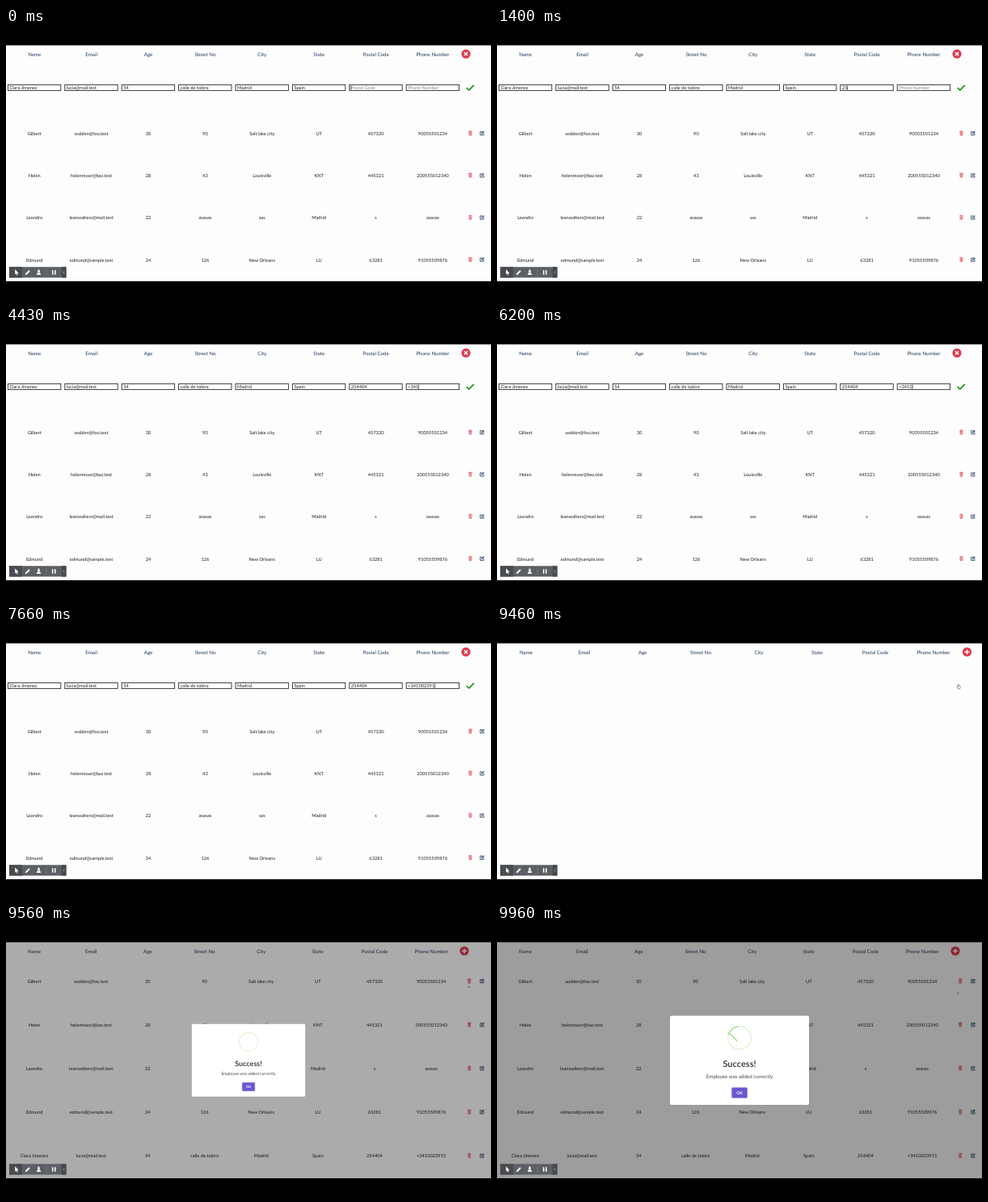
Write an HTML page that moves like this. It is 600x336 px and loops after 10 s.

```html
<!DOCTYPE html>
<html lang="en">
<head>
<meta charset="utf-8">
<title>Employee table</title>
<style>
  html, body { margin: 0; width: 100%; height: 100%; overflow: hidden; background: #000; }
  svg { display: block; width: 600px; height: 336px; }
  text { font: 5.7px Lato, "Open Sans", sans-serif; fill: #1d1f24; text-rendering: geometricPrecision; white-space: pre; }
  .mid { text-anchor: middle; }
  .head { font-size: 6.2px; fill: #1f3a5f; }
  .hint { fill: #858585; }
  .box { fill: #fff; stroke: #2b2b2b; stroke-width: .9; }
  .title { font-size: 11px; font-weight: 700; fill: #444; }
  .note { font-size: 6.2px; fill: #444; }
  .ok { font-size: 5.2px; font-weight: 700; fill: #fff; }
</style>
</head>
<body>
<svg id="stage" viewBox="0 0 600 336">
  <defs>
    <g id="trash">
      <path d="M-2.3-2.1H2.3M-.8-2.7H.8" stroke="#e2555f" stroke-width=".8"/>
      <path d="M-2-1.4H2L1.7 3H-1.7Z" fill="#e8757d"/>
      <path d="M-.8-.6V2.3M.8-.6V2.3" stroke="#f8d5d7" stroke-width=".4"/>
    </g>
    <g id="edit" fill="none" stroke="#1f3a5f">
      <path d="M.3-1.9H-2.3V2.4H2V.3" stroke-width=".8"/>
      <path d="M-.7 .8L2.3-2.2" stroke-width="1.3"/>
    </g>
    <g id="badge">
      <circle r="5.6" fill="#dc3b50"/>
      <path d="M-3 0H3M0-3V3" stroke="#fff" stroke-width="1.4"/>
    </g>
  </defs>

  <rect y="21.5" width="600" height="292.5" fill="#fdfdfd"/>
  <g id="form"></g>
  <g id="empty"></g>
  <g id="list"></g>
  <rect id="shade" y="21.5" width="600" height="292.5"/>

  <g id="popup">
    <rect x="214" y="112.5" width="172" height="110.5" rx="2" fill="#fff"/>
    <g fill="none" stroke="#a5dc86" stroke-width="1.4">
      <circle cx="300" cy="140" r="14.3" opacity=".35"/>
      <path id="arc"/>
      <path id="tip" stroke-linecap="round"/>
    </g>
    <text class="mid title" x="300" y="176.3">Success!</text>
    <text class="mid note" x="300" y="190">Employee was added correctly</text>
    <rect x="289.8" y="201" width="20.4" height="14" rx="1.8" fill="#c4bdec"/>
    <rect x="290.6" y="201.8" width="18.8" height="12.4" rx="1.2" fill="#6a58cd"/>
    <text class="mid ok" x="300" y="209.9">OK</text>
  </g>

  <path id="arrow" d="M0 0V4.2L1.1 3.3 1.8 4.8 2.5 4.5 1.8 3.1H3Z" fill="#111" stroke="#fff" stroke-width=".3"/>
  <path id="hand" d="M-.6-2.6V.4L-1.7-.3-2 .3-.5 2.7H1.7L2.2.6V-.5L.2-.9V-2.6Z" fill="#fff" stroke="#555" stroke-width=".6"/>

  <g id="toolbar">
    <rect x="4" y="296.3" width="70.5" height="13.2" fill="#5c5f63"/>
    <rect x="4" y="296.3" width="16" height="13.2" fill="#484b4f"/>
    <rect x="68.8" y="296.3" width="5.7" height="13.2" fill="#45484c"/>
    <path d="M11.2 299.3V305.7L12.7 304.4 13.7 306.7 14.7 306.2 13.7 304.1H15.6Z" fill="#fff"/>
    <path d="M25 305L29 301" stroke="#fff" stroke-width="2"/>
    <path d="M23.8 306.2L24.2 304.1 25.9 305.8Z" fill="#fff"/>
    <path d="M39.7 299.5H41.3L42.1 303.2H38.9ZM38.6 303.8H42.4L43.2 306H37.8Z" fill="#fff"/>
    <path d="M50 299V307" stroke="#8b8e91" stroke-width=".6"/>
    <path d="M57.7 300.2V305.8M60.8 300.2V305.8" stroke="#fff" stroke-width="1.5"/>
    <path d="M72.2 301.6L70.9 303 72.2 304.4" fill="none" stroke="#ddd" stroke-width=".6"/>
  </g>
</svg>
<script>
const LOOP = 10000;
const heads = ["Name", "Email", "Age", "Street No", "City", "State", "Postal Code", "Phone Number"];
const rows = [
  ["Gilbert", "walden@foo.test", "30", "90", "Salt lake city", "UT", "457320", "90055501234"],
  ["Helen", "helenmoor@baz.test", "28", "43", "Louisville", "KNT", "445321", "200555012340"],
  ["Leandro", "leanwalters@mail.test", "22", "asasas", "sas", "Madrid", "s", "asasas"],
  ["Edmund", "edmund@sample.test", "24", "126", "New Orleans", "LU", "63281", "91055509876"]
];
const added = ["Clara Jimenez", "lucia@mail.test", "54", "calle de tobira", "Madrid", "Spain", "254404", "+3410023915"];

// Key press times for the two fields typed live
const keys = {
  6: [1060, 1260, 1460, 1660, 1860, 2100],
  7: [3000, 3400, 3800, 4160, 5000, 6300, 6560, 6800, 7060, 7330, 7900]
};
const PHONE_FOCUS = 2660, SUBMIT = 9430, SAVED = 9530;

const $ = id => document.getElementById(id);
function add(parent, tag, attrs, content = "") {
  const el = document.createElementNS("http://www.w3.org/2000/svg", tag);
  for (const k in attrs) el.setAttribute(k, attrs[k]);
  el.textContent = content;
  parent.appendChild(el);
  return el;
}
const place = (el, x, y, extra = "") => el.setAttribute("transform", `translate(${x} ${y}) ${extra}`);
const show = (el, on) => { el.style.display = on ? "" : "none"; };

function drawRow(g, cells, colW, y, cls = "mid") {
  cells.forEach((c, i) => add(g, "text", { class: cls, x: (i + .5) * colW, y: y + 2 }, c));
}
function drawTable(g, colW, data, top, gap, trashX) {
  drawRow(g, heads, colW, 32.6, "mid head");
  data.forEach((cells, r) => {
    const y = top + r * gap;
    drawRow(g, cells, colW, y);
    place(add(g, "use", { href: "#trash" }), trashX, y - .6);
    place(add(g, "use", { href: "#edit" }), 589, y - .6);
  });
}
function drawBadge(g, x, turn = 0) {
  place(add(g, "use", { href: "#badge" }), x, 32.2, `rotate(${turn})`);
}

drawTable($("form"), 70.4, rows, 131, 52.2, 574.4);
drawBadge($("form"), 569, 45);
drawTable($("empty"), 72, [], 0, 0, 0);
drawBadge($("empty"), 581.5);
drawTable($("list"), 70.15, [...rows, added], 70, 54.1, 573.2);
drawBadge($("list"), 567);

const fieldX = i => i * 70.4 + 2.4;
const inputs = added.map((value, i) => {
  add($("form"), "rect", { class: "box", x: fieldX(i), y: 70.4, width: 65.4, height: 7.2 });
  return add($("form"), "text", { x: fieldX(i) + 2, y: 76 }, value);
});
add($("form"), "path", { d: "M569.8 74.2L572.8 77 578.8 70.8", fill: "none", stroke: "#1c941c", "stroke-width": 1.7 });
const caret = add($("form"), "rect", { y: 71.4, width: .6, height: 5.4 });

// Linear interpolation through [time, value] steps
function tween(steps, t) {
  if (t <= steps[0][0]) return steps[0][1];
  for (let i = 1; i < steps.length; i++) {
    const [t0, a] = steps[i - 1], [t1, b] = steps[i];
    if (t < t1) return a + (b - a) * (t - t0) / (t1 - t0);
  }
  return steps[steps.length - 1][1];
}

const shadeSteps = [[9505, 0], [9570, .38]];
const scaleSteps = [[9517, .7], [9650, 1.05], [9755, .95], [9815, 1]];
const turnSteps = [[9725, 0], [9960, 290], [10017, 360]];
const tipSteps = [[9870, 0], [9960, 10], [10000, 12.5]];
const mouseX = [[8360, 548], [9000, 571], [9460, 571], [9530, 572.3], [9960, 569.6]];
const mouseY = [[8360, 104], [9000, 76], [9530, 75], [9700, 76], [9960, 83]];

function typeFields(t) {
  for (const i in keys) {
    const n = keys[i].filter(k => k <= t).length;
    inputs[i].textContent = n ? added[i].slice(0, n) : heads[i];
    inputs[i].setAttribute("class", n ? "" : "hint");
  }
  const active = t < PHONE_FOCUS ? 6 : 7;
  const past = [active === 6 ? 0 : PHONE_FOCUS, ...keys[active]].filter(k => k <= t);
  const typed = past.length > 1;
  caret.setAttribute("x", fieldX(active) + 2 + (typed ? inputs[active].getComputedTextLength() : -.3));
  show(caret, (t - past[past.length - 1]) % 1000 < 500);
}

function drawPopup(t) {
  const s = tween(scaleSteps, t);
  place($("popup"), 300, 167.7, `scale(${s}) translate(-300 -167.7)`);

  const turn = tween(turnSteps, t);
  const from = -15 + Math.max(0, turn - 180), to = -15 + Math.min(180, turn);
  const at = deg => {
    const a = deg * Math.PI / 180;
    return `${300 + 14.3 * Math.cos(a)} ${140 - 14.3 * Math.sin(a)}`;
  };
  $("arc").setAttribute("d", `M${at(from)}A14.3 14.3 0 0 0 ${at(to)}`);
  show($("arc"), turn > 0);

  const len = tween(tipSteps, t);
  $("tip").setAttribute("d", `M287 133.6l${len} ${len}`);
  show($("tip"), len > 0);
}

function render(t) {
  const saved = t >= SAVED, typing = t < SUBMIT;
  show($("form"), typing);
  show($("empty"), !typing && !saved);
  show($("list"), saved);
  show($("popup"), saved);
  show($("shade"), saved);
  if (typing) typeFields(t);
  if (saved) {
    $("shade").setAttribute("opacity", tween(shadeSteps, t));
    drawPopup(t);
  }
  const x = tween(mouseX, t), y = tween(mouseY, t);
  const pointing = x > 567 && !saved;
  show($("arrow"), t >= 8360 && !pointing);
  show($("hand"), t >= 8360 && pointing);
  place($("arrow"), x, y, saved ? "scale(.7)" : "");
  place($("hand"), x, y);
}

const start = performance.now();
function tick() {
  render((performance.now() - start) % LOOP);
  requestAnimationFrame(tick);
}
tick();
</script>
</body>
</html>
```
